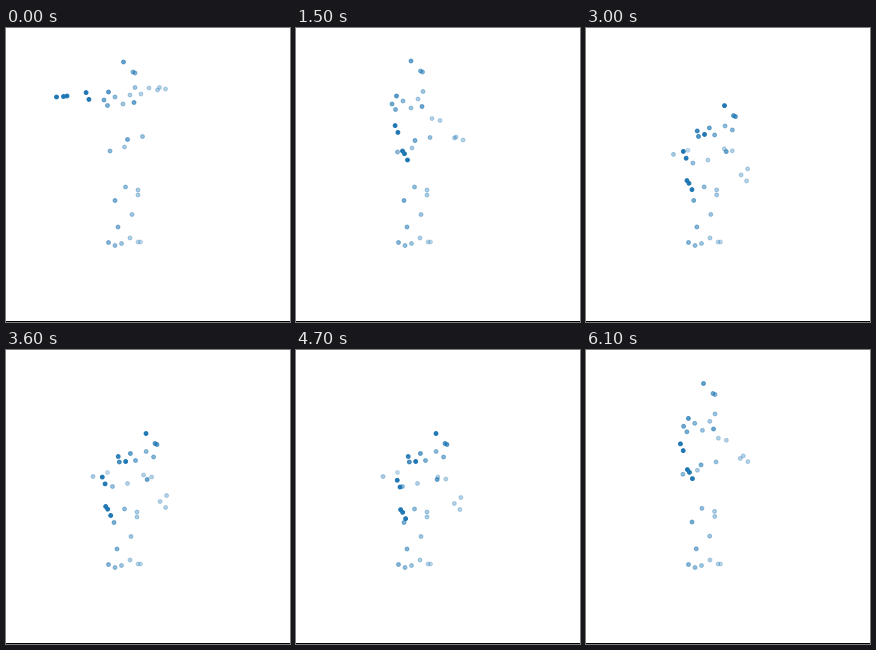
Recreate the animation shown at these times as a matplotlib script. Size 284x294 px, loop 6.3 s.

```python
import numpy as np
import matplotlib.pyplot as plt
from matplotlib.animation import FuncAnimation
from matplotlib.colors import to_rgb

W, H, DPI = 284, 294, 100
STEP, FRAMES = 100, 63
PX = 72 / DPI
BLUE = to_rgb("tab:blue")
FLOOR = 215

# Markers of the standing figure, grouped by how they move.
HEAD = [(115, 33), (124.5, 43), (126.5, 44)]
SHOULDERS = [(100.5, 68), (127, 63.5)]
BACK = [(96, 76), (99.5, 81.5), (107, 73), (115, 80), (122, 71)]
CHEST = [(126, 78.5)]
WAIST = [(134, 109.5), (119, 112.5)]
RUMP = [(116, 120), (101.5, 124)]
LEGS = [(118.5, 159), (131, 162), (131, 167),
        (108, 172.5), (125, 186.5), (111, 199)]
FEET = [(124, 210), (102.5, 214.5), (109, 217.5),
        (115.5, 215.5), (132, 214), (134.5, 214)]

# Moments when the figure stands still: (from, to)
HOLDS = [(0, 200), (1500, 1600), (4300, 4400), (5300, 5400),
         (5500, 5600), (5700, 6000), (6100, 6200)]

# (ms, amount): bowing of the trunk, backward swing of the arms
BOW = [(1500, 0), (2400, .2), (3000, .94), (3300, 1), (4700, 1), (5100, .97),
       (5200, .8), (5300, .6), (5500, .2), (6100, .1)]
SWING = [(1500, 0), (2400, .3), (3000, .9), (3300, .35), (3600, 1),
         (4200, .35), (5200, 1.2), (5500, .5), (6100, .3)]


def held(t):
    return next((a for a, b in HOLDS if a <= t <= b), t)


def track(keys, t):
    return np.interp(t, *zip(*keys))


def arms_up(t):
    u = np.clip((1500 - t) / 600, 0, 1)
    return u * u * (3 - 2 * u)


def arc(rest, shift, amount):
    """Sideways travel leads, the fall follows with the square."""
    return np.array(rest, float) + np.array(shift) * (amount, amount ** 2)


def trunk(rest, fall, bow, lift):
    rest = np.array(rest, float)
    forward = 25 - 10.5 * ((rest[:, 1] - 33) / 47) ** 2
    shift = np.column_stack([forward, np.full(len(rest), fall)])
    return arc(rest, shift, bow) + lift


def legs(bow):
    x, y = np.array(LEGS).T
    lean = 3 * (bow ** .5 - bow) * (FLOOR - y) / 56
    return np.column_stack([x - 4 * lean, y - lean])


def arm(shoulder, hang, spread, up):
    """Elbow pair and three hand markers; each limb part turns from
    its hanging vector to its spread vector."""
    turn = up * np.pi / 2
    upper, fore, mid, tip = np.cos(turn) * hang + np.sin(turn) * spread
    elbow = shoulder + upper
    wrist = elbow + fore
    return elbow, wrist, wrist + mid, wrist + tip


def left_arm(shoulder, bow, swing, up):
    hang = np.array([(-22 * swing, 33 - 14 * swing),
                     (6 - 4 * bow, 22 + 4 * bow), (2, 2.7), (5, 9)])
    spread = np.array([(-21, 4), (-20.5, 0), (-3.5, .5), (-10.5, 1)])
    elbow, *hand = arm(shoulder, hang, spread, up)
    return [elbow - (1.4, 3.4), elbow + (1.4, 3.4), *hand]


def right_arm(shoulder, bow, swing, up):
    grip = min(1, 3 * bow)
    hang = np.array([(13 - 19 * swing, 28 - 9 * swing),
                     (18.5 - 6 * bow, 18.5 + 7 * bow),
                     (1.5 + 5 * grip, -1 - 5 * grip),
                     (8.5 - 3 * grip, 2 + 4 * grip)])
    spread = np.array([(10, 3.5), (12.5, -1), (2, -2.5), (8, -1)])
    elbow, *hand = arm(shoulder, hang, spread, up)
    half = np.array([4, 1 - 4 * up])
    return [elbow - half, elbow + half, *hand]


def figure_at(t):
    bow, swing, up = track(BOW, t), track(SWING, t), arms_up(t)
    hips = bow ** .5
    raised = np.array([2, -4]) * up
    drift = np.array([2.5, -1]) * up
    shoulders = trunk(SHOULDERS, 43.5, bow, raised)
    # (standing markers, where they are now, nearness to the viewer)
    body = [
        (HEAD, trunk(HEAD, 50.5, bow, -drift * (-1, 1)), 1.03 + .15 * bow),
        (SHOULDERS, shoulders, .92 + .12 * bow),
        (BACK, trunk(BACK, 30.5, bow, raised), .8 + .15 * bow),
        (CHEST, trunk(CHEST, 51, bow, raised), 1.13),
        (WAIST, arc(WAIST, (-12.5, 24), hips) + drift, 1.02 - .15 * bow),
        (RUMP, arc(RUMP, (-14.5, 2.5), hips) + drift, .75 - .15 * bow),
        (LEGS, legs(bow) + drift * (.4, 0), .9),
        (FEET, np.array(FEET), .8),
    ]
    points = [now for _, now, _ in body]
    near = [base - .01 * (np.array(rest)[:, 0] - 100)
            for rest, _, base in body]
    points += [left_arm(shoulders[0], bow, swing, up),
               right_arm(shoulders[1], bow, swing, up)]
    near += [np.full(5, 1), np.full(5, .53)]
    return np.vstack(points), np.clip(np.concatenate(near), .4, 1)


fig = plt.figure(figsize=(W / DPI, H / DPI), dpi=DPI, facecolor="white")
ax = fig.add_axes([0, 0, 1, 1])
ax.set(xlim=(0, W), ylim=(H, 0))
ax.axis("off")
ax.add_patch(plt.Rectangle((0, H - 1), W, 1, color="black", lw=0,
                           antialiased=False))
start = figure_at(0)[0]
dots = ax.scatter(*start.T, s=(3.8 * PX) ** 2, linewidths=PX)


def draw(i):
    points, near = figure_at(held(i * STEP))
    # Fill and outline overlap, so each gets part of the opacity.
    colors = [(*BLUE, 1 - (1 - a) ** .5) for a in near]
    dots.set_offsets(points)
    dots.set_facecolors(colors)
    dots.set_edgecolors(colors)
    return dots,


anim = FuncAnimation(fig, draw, frames=FRAMES, interval=STEP,
                     repeat=True, repeat_delay=0)
plt.show()
```
